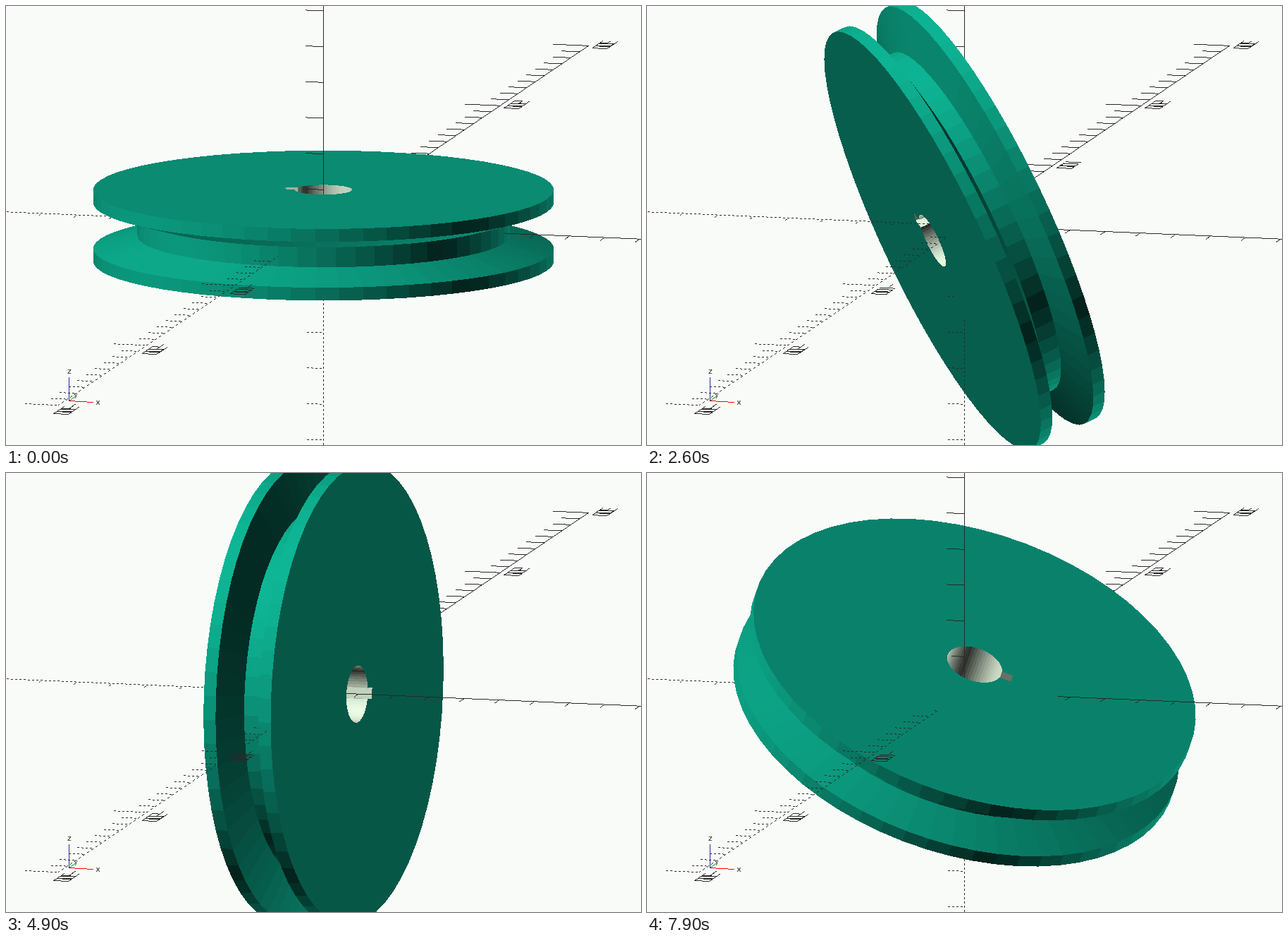
Animation, 901 px wide and 622 px high, one loop 8000 ms. Source, as an HTML page with a canvas:

```html
<!DOCTYPE html>
<html lang="en">
<head>
<meta charset="utf-8">
<title>Tumbling pulley</title>
<style>
html, body { margin: 0; width: 100%; height: 100%; overflow: hidden; background: #f9fbf9; }
canvas { display: block; }
</style>
</head>
<body>
<canvas id="stage" width="901" height="622"></canvas>
<script>
const W = 901, H = 622, RAD = Math.PI / 180;
const CX = 450.5, CY = 311, SCALE = 51.42;
const FRAME_MS = 100, FRAMES = 80, STEP = 2 * RAD;

const ctx = document.getElementById('stage').getContext('2d');
const image = ctx.createImageData(W, H);
const pixels = new Uint32Array(image.data.buffer);
const depth = new Float32Array(W * H);

const rgb = (r, g, b) => (255 << 24 | Math.min(b, 255) << 16 | Math.min(g, 255) << 8 | Math.min(r, 255)) >>> 0;
const BACKGROUND = rgb(249, 251, 249), INK = rgb(40, 40, 40);
const TEAL = [12, 160, 131], CREAM = [205, 222, 200];

// Orthographic camera: turned around z, then raised above the ground.
const TURN = 14.1 * RAD, RAISE = 9.8 * RAD;
const sa = Math.sin(TURN), ca = Math.cos(TURN);
const se = Math.sin(RAISE), ce = Math.cos(RAISE);

// World to screen: x right, y down, third value grows towards the viewer.
const project = ([x, y, z]) => [
  CX + SCALE * (ca * x + sa * y),
  CY - SCALE * (-sa * se * x + ca * se * y + ce * z),
  SCALE * (sa * ce * x - ca * ce * y + se * z)
];

// ---- pulley ----
const FACET = 6 * RAD;
const KEY_LENGTH = 1.1, KEY_HALF = 0.155, BORE = 0.79;
const KEY_TIP = Math.atan(KEY_HALF / KEY_LENGTH), KEY_ROOT = Math.asin(KEY_HALF / BORE);

function ring(radius, angle) {
  const off = (angle % FACET + FACET) % FACET - FACET / 2;
  return radius * Math.cos(FACET / 2) / Math.cos(off);
}

function bore(angle) {
  const d = Math.abs(angle - Math.PI);
  if (d <= KEY_TIP + 1e-9) return KEY_LENGTH / Math.cos(d);
  if (d <= KEY_ROOT) return KEY_HALF / Math.sin(d);
  return ring(BORE, angle);
}

const RIM = 6.355, GROOVE = 5.14;
const profile = [[0, 1], [RIM, 1], [RIM, 0.64], [GROOVE, 0.28],
                 [GROOVE, -0.28], [RIM, -0.64], [RIM, -1], [0, -1]];

const angles = Array.from({ length: 61 }, (_, i) => i * FACET);
for (const d of [KEY_TIP, KEY_ROOT]) angles.push(Math.PI - d, Math.PI + d);
angles.sort((a, b) => a - b);

const columns = angles.map(a => profile.map(([radius, z]) => {
  const r = radius ? ring(radius, a) : bore(a);
  return [r * Math.cos(a), r * Math.sin(a), z];
}));

function tumble([x, y, z], angle) {
  const s = Math.sin(angle), c = Math.cos(angle);
  const up = c * z - s * x;
  return [c * x + s * z, c * y + s * up, c * up - s * y];
}

// ---- rasteriser ----
function fillPolygon(points, base) {
  const [p, q, r, t] = points;
  const u = [r[0] - p[0], r[1] - p[1], r[2] - p[2]];
  const v = [t[0] - q[0], t[1] - q[1], t[2] - q[2]];
  const nx = u[1] * v[2] - u[2] * v[1];
  const ny = u[2] * v[0] - u[0] * v[2];
  const nz = u[0] * v[1] - u[1] * v[0];
  const length = Math.hypot(nx, ny, nz);
  if (Math.abs(nz) < 1e-4 * length || !length) return;

  // Two opposite lights, so only the size of the cosine matters.
  const light = 0.2 + Math.abs(-nx - ny + nz) / (length * Math.sqrt(3));
  const color = rgb(...base.map(c => Math.round(c * light)));
  const gx = -nx / nz, gy = -ny / nz;

  const ys = points.map(a => a[1]);
  const top = Math.max(0, Math.ceil(Math.min(...ys) - 0.5));
  const bottom = Math.min(H - 1, Math.floor(Math.max(...ys) - 0.5));
  for (let y = top; y <= bottom; y++) {
    const row = y + 0.5;
    let left = Infinity, right = -Infinity;
    for (let i = 0; i < 4; i++) {
      const a = points[i], b = points[(i + 1) % 4];
      if ((a[1] <= row) === (b[1] <= row)) continue;
      const x = a[0] + (b[0] - a[0]) * (row - a[1]) / (b[1] - a[1]);
      left = Math.min(left, x);
      right = Math.max(right, x);
    }
    const from = Math.max(0, Math.ceil(left - 0.5));
    const to = Math.min(W - 1, Math.ceil(right - 0.5) - 1);
    for (let x = from; x <= to; x++) {
      const d = p[2] + gx * (x + 0.5 - p[0]) + gy * (row - p[1]);
      const at = y * W + x;
      if (d > depth[at]) {
        depth[at] = d;
        pixels[at] = color;
      }
    }
  }
}

function drawLine(a, b, color, dashed) {
  const n = Math.ceil(Math.max(Math.abs(b[0] - a[0]), Math.abs(b[1] - a[1]))) || 1;
  for (let i = 0; i <= n; i++) {
    if (dashed && Math.floor(i / 3) % 2 === 0) continue;
    const k = i / n;
    const x = Math.floor(a[0] + (b[0] - a[0]) * k);
    const y = Math.floor(a[1] + (b[1] - a[1]) * k);
    if (x < 0 || y < 0 || x >= W || y >= H) continue;
    const at = y * W + x;
    if (a[2] + (b[2] - a[2]) * k > depth[at]) pixels[at] = color;
  }
}

// ---- axes ----
const glyphs = {
  '-': [[0, .5], [1, .5]],
  0: [[0, 0], [1, 0], [1, 1], [0, 1], [0, 0]],
  1: [[.5, 0], [.5, 1]],
  2: [[0, 1], [1, 1], [1, .5], [0, .5], [0, 0], [1, 0]],
  3: [[0, 1], [1, 1], [1, .5], [0, .5], [1, .5], [1, 0], [0, 0]]
};

const lines = [];
const addLine = (a, b, dashed) => lines.push([project(a), project(b), INK, dashed]);

// Labels lie on the ground and read towards the viewer.
function addLabel(y) {
  const start = y + (y > 0 ? 0.84 : 0.25);
  [...String(y * 10)].forEach((char, i) => {
    const path = glyphs[char].map(([u, v]) => [0.2 + 0.42 * v, start - i * 0.42 - u * 0.34, 0]);
    for (let k = 1; k < path.length; k++) addLine(path[k - 1], path[k], false);
  });
}

for (const side of [1, -1]) {
  const dashed = side < 0;
  for (let axis = 0; axis < 3; axis++) {
    const reach = axis === 1 ? 30 : 10;
    const along = d => [0, 1, 2].map(k => k === axis ? d * side : 0);
    addLine([0, 0, 0], along(reach), dashed);
    for (let i = 1; i <= reach; i++) {
      const end = along(i);
      end[axis === 0 ? 1 : 0] -= i % 10 ? 0.5 : 1;
      addLine(along(i), end, dashed);
    }
  }
  for (const n of [10, 20, 30]) addLabel(n * side);
}

function addPointer(dx, dy, color) {
  lines.push([[89.5, 559.5, 1e6], [89.5 + dx, 559.5 + dy, 1e6], color, false]);
}
addPointer(34, 2, rgb(255, 0, 0));
addPointer(8, -6, rgb(0, 170, 0));
addPointer(0, -33, rgb(40, 40, 150));

function render(frame) {
  pixels.fill(BACKGROUND);
  depth.fill(-1e5);
  const placed = columns.map(col => col.map(p => project(tumble(p, frame * STEP))));
  for (let i = 1; i < placed.length; i++) {
    const a = placed[i - 1], b = placed[i];
    for (let k = 0; k < 8; k++) {
      const next = (k + 1) % 8;
      fillPolygon([a[k], b[k], b[next], a[next]], k === 7 ? CREAM : TEAL);
    }
  }
  for (const line of lines) drawLine(...line);
  ctx.putImageData(image, 0, 0);

  ctx.fillStyle = '#282828';
  ctx.font = '11px "DejaVu Sans", sans-serif';
  ctx.textAlign = 'center';
  ctx.fillText('x', 130.5, 565);
  ctx.fillText('z', 90, 521);
  ctx.font = '8px "DejaVu Sans", sans-serif';
  ctx.fillText('y', 99, 554);
}

let start = null, shown = 0;
function tick(now) {
  if (start === null) start = now;
  const frame = Math.floor((now - start) / FRAME_MS) % FRAMES;
  if (frame !== shown) render(shown = frame);
  requestAnimationFrame(tick);
}
render(0);
requestAnimationFrame(tick);
</script>
</body>
</html>
```
